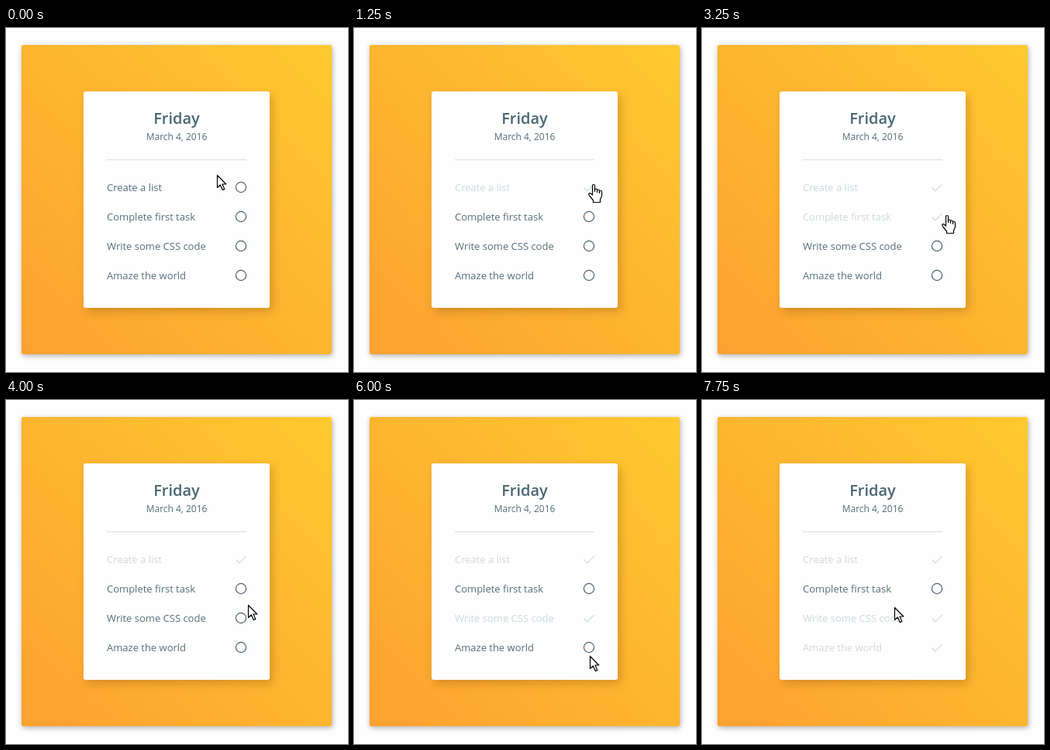
Write an HTML page that moves like this. It is 441 px wide and 445 px high and loops after 8 s.

```html
<!DOCTYPE html>
<html lang="en">
<head>
<meta charset="utf-8">
<title>To-do list</title>
<style>
  html, body { margin: 0; width: 100%; height: 100%; overflow: hidden; background: #fefefe; }
  .panel, .card, svg { position: absolute; }
  .panel {
    left: 20px; top: 22px; width: 400px; height: 400px; border-radius: 2px;
    background: linear-gradient(45deg, #fca130, #ffc92f);
    box-shadow: 1px 2px 7px rgba(0, 0, 0, .32);
  }
  .card {
    left: 100px; top: 82px; width: 240px; height: 280px; border-radius: 3px;
    background: #fefefe;
    box-shadow: 4px 5px 12px rgba(90, 50, 0, .24);
  }
  svg { left: 0; top: 0; }
  text { font-family: "Open Sans", sans-serif; font-size: 13px; fill: #546e7a; }
  .title { font-size: 20px; font-weight: 600; fill: #4a6572; }
  .date { font-size: 12px; }
  .ring, .tick { fill: none; stroke-width: 1.2; }
  .ring { stroke: #4a6572; }
  .tick { stroke: #cfd8dc; stroke-dasharray: 20; }
  .cursor { fill: #fff; stroke: #000; stroke-width: 1.2; stroke-linejoin: round; }
</style>
</head>
<body>
<div class="panel"></div>
<div class="card"></div>
<svg width="441" height="445" viewBox="0 0 441 445">
  <text class="title" x="220" y="124" text-anchor="middle">Friday</text>
  <text class="date" x="220" y="145" text-anchor="middle">March 4, 2016</text>
  <path d="M130 170.5H310" stroke="#d9dcde"/>
  <g id="list"></g>
  <path id="arrow" class="cursor" d="M.5.5V16.5L4.3 13L7.3 19.6L9.8 18.5L7 12H11.8Z"/>
  <path id="hand" class="cursor" d="M5.5 14V2a1.5 1.5 0 0 1 3 0V9.5V7.5a1.5 1.5 0 0 1 3 0V10.5V8.5a1.5 1.5 0 0 1 3 0V11.5V10a1.5 1.5 0 0 1 3 0V15.5L15.5 20V23.5H6.5V21L2 15.5L.8 13.5Q.5 11.5 2.5 11.5Z"/>
</svg>
<script>
const LOOP = 8000, TICK = 250, FADE = 300;
const FIRST_ROW = 206, ROW_GAP = 38;

const tasks = [
  { label: 'Create a list', clicks: [900] },
  { label: 'Complete first task', clicks: [2150, 3400] },
  { label: 'Write some CSS code', clicks: [4600] },
  { label: 'Amaze the world', clicks: [6700] }
];

// Pointer path: time, x, y
const path = [
  [0, 272, 190], [500, 305, 201], [750, 308, 202], [1250, 308, 202],
  [2000, 310, 247], [2500, 310, 247], [3250, 315, 242], [3750, 315, 242],
  [4250, 309, 287], [5250, 309, 287], [5750, 314, 322], [6000, 304, 331],
  [6250, 304, 331], [6500, 309, 323], [7000, 309, 323], [7500, 315, 319],
  [7750, 248, 268], [8000, 248, 268]
];

const byId = id => document.getElementById(id);
const clamp = v => Math.min(1, Math.max(0, v));
const mix = (a, b, p) => a + (b - a) * p;

function add(parent, tag, attrs) {
  const node = document.createElementNS('http://www.w3.org/2000/svg', tag);
  for (const key in attrs) node.setAttribute(key, attrs[key]);
  return parent.appendChild(node);
}

tasks.forEach((task, i) => {
  const y = FIRST_ROW + i * ROW_GAP, list = byId('list');
  task.y = y;
  task.text = add(list, 'text', { x: 130, y: y + 5 });
  task.text.textContent = task.label;
  task.ring = add(list, 'circle', { class: 'ring', cx: 303, cy: y, r: 6.6 });
  task.tick = add(list, 'path', { class: 'tick', d: `M296.5 ${y + .5}l4.3 4.3l9-9` });
});

function doneAmount(clicks, t) {
  return clicks.reduce((p, start, i) => {
    const k = clamp((t - start) / FADE);
    return p + (i % 2 ? -k : k);
  }, 0);
}

function drawTask(task, t) {
  const p = doneAmount(task.clicks, t);
  const color = [[84, 207], [110, 216], [122, 220]].map(([a, b]) => Math.round(mix(a, b, p)));
  task.text.style.fill = `rgb(${color})`;
  task.ring.setAttribute('r', 6.6 + p);
  task.ring.style.opacity = clamp((1 - p) * 1.5);
  task.tick.style.strokeDashoffset = 20 * (1 - clamp(p * 2 - 1));
}

function drawCursor(t) {
  const i = path.findIndex(step => step[0] > t);
  const [t0, x0, y0] = path[i - 1], [t1, x1, y1] = path[i];
  const p = (t - t0) / (t1 - t0);
  const x = Math.round(mix(x0, x1, p)), y = Math.round(mix(y0, y1, p));
  const hover = tasks.some(task => Math.abs(task.y - y) <= 10);
  byId('arrow').style.display = hover ? 'none' : '';
  byId('hand').style.display = hover ? '' : 'none';
  byId('arrow').setAttribute('transform', `translate(${x} ${y})`);
  byId('hand').setAttribute('transform', `translate(${x - 6} ${y})`);
}

const began = performance.now();
function draw() {
  const t = Math.floor((performance.now() - began) % LOOP / TICK) * TICK;
  tasks.forEach(task => drawTask(task, t));
  drawCursor(t);
  requestAnimationFrame(draw);
}
draw();
</script>
</body>
</html>
```
